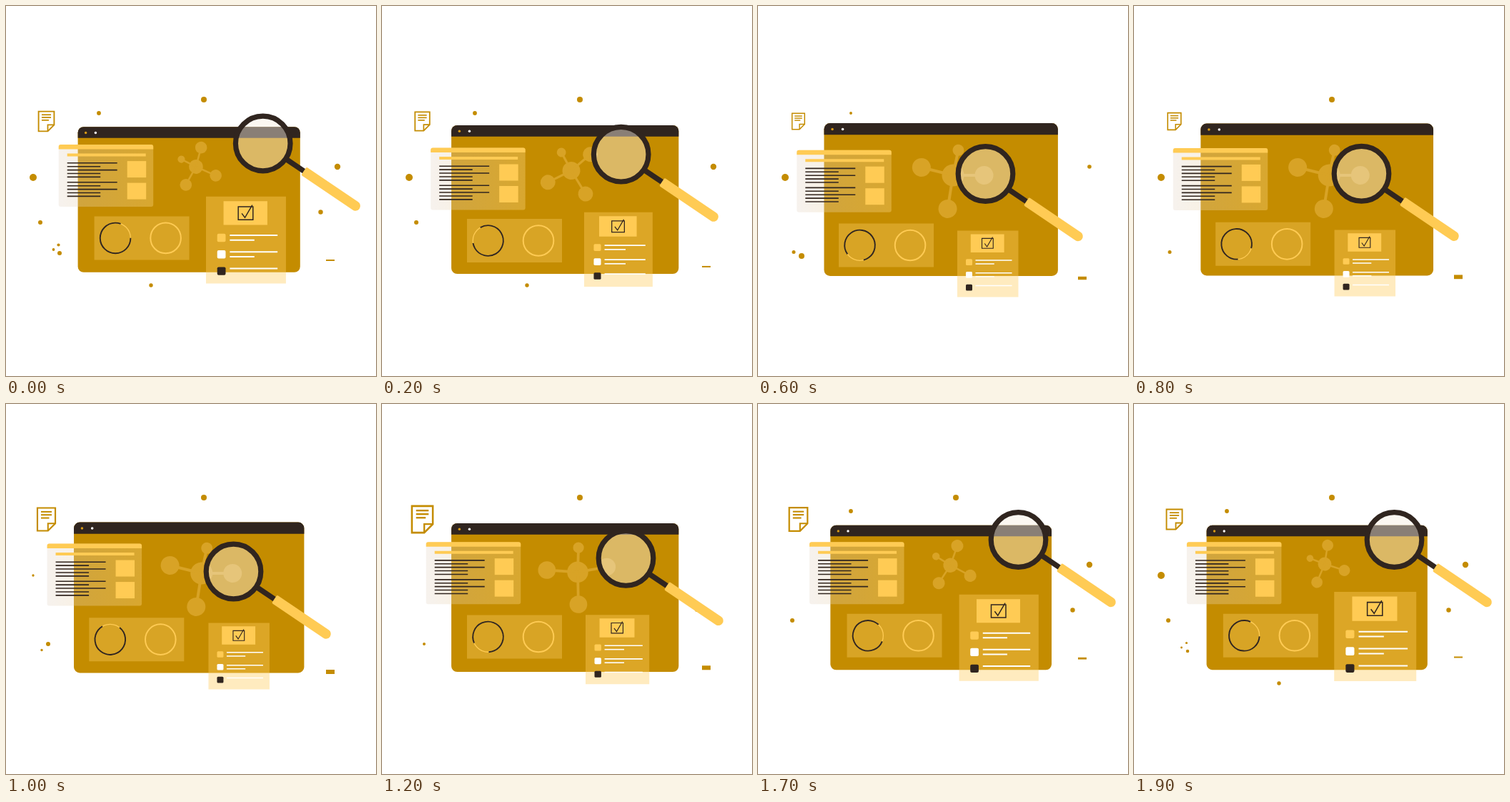
An HTML page with a canvas that plays this animation: 518 px wide and 518 px high, repeating every 2 s.

```html
<!DOCTYPE html>
<html lang="en">
<head>
<meta charset="utf-8">
<title>Dashboard search</title>
<style>
html, body { margin: 0; height: 100%; overflow: hidden; background: #fff; }
canvas { display: block; width: 100vw; height: 100vh; }
</style>
</head>
<body>
<canvas></canvas>
<script>
const SIZE = 518, LOOP = 2000, STEP = 100, TURN = Math.PI * 2, DEG = Math.PI / 180;
const GOLD = '#c48c00', YELLOW = '#ffcb54', DARK = '#30251f', WHITE = '#fff', SOFT = '#d8a326';
const canvas = document.querySelector('canvas');
const c = canvas.getContext('2d');
const ratio = window.devicePixelRatio || 1;
canvas.width = canvas.height = Math.round(SIZE * ratio);

let now = 0;

const wrap = t => (t % LOOP + LOOP) % LOOP;

// Eases around the loop through [time, value] points given in cyclic order.
function ease(...points) {
  for (let i = 0; i < points.length; i++) {
    const [start, from] = points[i];
    const [end, to] = points[(i + 1) % points.length];
    const span = wrap(end - start) || LOOP;
    const u = wrap(now - start) / span;
    if (u < 1) return from + (to - from) * u * u * (3 - 2 * u);
  }
}

function box(x, y, w, h, color, radius = 0) {
  c.fillStyle = color;
  c.beginPath();
  c.roundRect(x, y, w, h, radius);
  c.fill();
}

function dot(x, y, r, color = GOLD) {
  c.fillStyle = color;
  c.beginPath();
  c.arc(x, y, r, 0, TURN);
  c.fill();
}

function path(points, width, color, closed = false) {
  c.strokeStyle = color;
  c.lineWidth = width;
  c.beginPath();
  points.forEach(([x, y]) => c.lineTo(x, y));
  if (closed) c.closePath();
  c.stroke();
}

const line = (x1, y1, x2, y2, width, color) => path([[x1, y1], [x2, y2]], width, color);

function ring(x, y, r, width, color, from = 0, to = TURN) {
  c.strokeStyle = color;
  c.lineWidth = width;
  c.beginPath();
  c.arc(x, y, r, from, to);
  c.stroke();
}

function place(x, y, scale, draw) {
  c.save();
  c.translate(x, y);
  c.scale(scale, scale);
  draw();
  c.restore();
}

// Dots grow in at `start` and shrink away after `span` milliseconds.
function blink(start, span, ...dots) {
  const age = wrap(now - start);
  if (age >= span) return;
  const size = Math.min(1, (age + 100) / 200, (span - age) / 150);
  for (const [x, y, r] of dots) dot(x, y, r * size);
}

function drawDecorations() {
  blink(1400, 1300, [130, 150, 2.9], [464, 225, 4.2]);
  blink(1400, 1100, [48, 303, 3]);
  blink(700, 1800, [277, 131, 4]);
  blink(1800, 1250, [38, 240, 5]);
  blink(1150, 1000, [440.5, 288.5, 3.2]);
  blink(1800, 600, [203, 391, 2.7]);
  blink(1850, 300, [75, 346, 3], [73.5, 334.5, 2.1], [66.5, 341, 1.9]);
  blink(500, 600, [50, 344.5, 2.5]);
  blink(500, 300, [61, 350, 4]);
  blink(900, 400, [59, 336, 3]);

  const h = ease([200, 2], [900, 6], [1200, 6], [1900, 2]);
  box(448, ease([1900, 354.5], [600, 381]) - h / 2, 12, h, GOLD);
}

function drawNote() {
  place(56.5, 161.5, ease([1900, 1], [700, 0.79], [1200, 1.33], [1500, 1.33]), () => {
    path([[-11, -14], [11, -14], [11, 5], [2, 14], [-11, 14]], 1.9, GOLD, true);
    path([[11, 5], [2, 5], [2, 14]], 1.8, GOLD);
    [6.6, 6.6, 3.5].forEach((end, i) => line(-6.6, -9.3 + i * 3.8, end, -9.3 + i * 3.8, 1.8, GOLD));
  });
}

function drawWindow() {
  place(256.2, 271, ease([1850, 309], [550, 327.5]) / 310, () => {
    box(-155, -101.4, 310, 202.8, GOLD, 8);
    box(-155, -101.4, 310, 15.5, DARK, [8, 8, 0, 0]);
    dot(-144, -93.2, 1.7, '#d99b16');
    dot(-130.3, -93.2, 1.7, WHITE);
  });
}

function drawMolecule() {
  const open = ease([1900, 0], [500, 1], [1000, 1]);
  const x = ease([200, 265], [600, 273], [1200, 274]);
  const nodes = [[0, 36, 8], [78, 43.5, 13], [177, 47.5, 13], [272, 45.5, 13]];
  place(x, 224 + 13 * open, 0.61 + 0.39 * open, () => {
    c.rotate((81 * open - 69) * DEG);
    dot(0, 0, 15.5, SOFT);
    for (const [angle, length, r] of nodes) {
      const nx = length * Math.sin(angle * DEG), ny = -length * Math.cos(angle * DEG);
      line(0, 0, nx, ny, 4, SOFT);
      dot(nx, ny, r, SOFT);
    }
  });
}

function drawArticle() {
  const x = ease([1950, 74], [650, 54]);
  const y = ease([1900, 193.3], [450, 202.5], [1300, 192.8]);
  place(x, y, 1, () => {
    const glass = c.createLinearGradient(0, 0, 132, 0);
    glass.addColorStop(0, 'rgba(228,214,200,.32)');
    glass.addColorStop(1, 'rgba(250,212,125,.38)');
    box(0, 0, 132.5, 87, glass, 3);
    box(0, 0, 132.5, 6.5, YELLOW, [3, 3, 0, 0]);
    box(12, 12.5, 110, 4, YELLOW);
    for (const top of [25.7, 52.7]) {
      for (let i = 0; i < 5; i++) {
        const ly = top + i * 4.9;
        line(12, ly, i === 0 || i === 2 ? 82 : 58.5, ly, 1.6, DARK);
      }
    }
    for (const top of [23, 53.5]) box(96, top, 26.5, 23, YELLOW);
  });
}

function drawCharts() {
  const x = ease([1850, 125], [550, 113]);
  const y = ease([1900, 293.8], [600, 304.5], [1400, 293.8]);
  const gap = (ease([0, 55], [200, -65], [600, -160], [1500, -630], [2000, -665]) - 90) * DEG;
  const half = 0.6;
  place(x, y, 1, () => {
    box(0, 0, 133, 61, 'rgba(255,210,110,.34)');
    ring(29.5, 30.5, 21.3, 1.3, YELLOW);
    ring(29.5, 30.5, 21.3, 1.9, DARK, gap + half, gap + TURN - half);
    ring(100, 30.5, 21.3, 2, YELLOW);
  });
}

function drawChecklist() {
  const x = ease([0, 280], [200, 283], [600, 279], [1200, 285]);
  const y = ease([1900, 263], [500, 314.5], [700, 314.5]);
  const width = ease([1900, 115], [400, 85.5], [1000, 85.5]);
  place(x, y, width / 114, () => {
    box(0, 0, 114, 124, 'rgba(255,205,95,.4)');
    box(25, 6.5, 62.5, 34, YELLOW);
    path([[46, 14.5], [67, 14.5], [67, 33], [46, 33]], 1.5, DARK, true);
    path([[51, 24], [55.5, 30], [66, 12]], 1.5, DARK);
    [YELLOW, WHITE, DARK].forEach((color, i) => {
      const top = 53 + i * 23.7;
      box(16, top, 12, 11.5, color, 2);
      line(34, top + 2.2, 102, top + 2.2, 2, WHITE);
      if (i < 2) line(34, top + 9, 69, top + 9, 2, WHITE);
    });
  });
}

function drawMagnifier() {
  const x = ease([1900, 364.5], [400, 318.5], [1000, 318.5], [1400, 364.5]);
  const y = ease([1900, 190], [600, 235], [1000, 234.5], [1450, 190]);
  place(x, y, 1, () => {
    dot(0, 0, 36, 'rgba(245,238,225,.45)');
    ring(0, 0, 38.3, 7.2, DARK);
    c.rotate(34 * DEG);
    line(40, 0, 72, 0, 7.5, DARK);
    box(69, -6.8, 94, 13.6, YELLOW, [2, 6.8, 6.8, 2]);
  });
}

function render() {
  now = Math.floor(performance.now() / STEP) * STEP % LOOP;
  c.setTransform(ratio, 0, 0, ratio, 0, 0);
  c.fillStyle = WHITE;
  c.fillRect(0, 0, SIZE, SIZE);
  drawDecorations();
  drawNote();
  drawWindow();
  drawMolecule();
  drawArticle();
  drawCharts();
  drawChecklist();
  drawMagnifier();
  requestAnimationFrame(render);
}

render();
</script>
</body>
</html>
```
